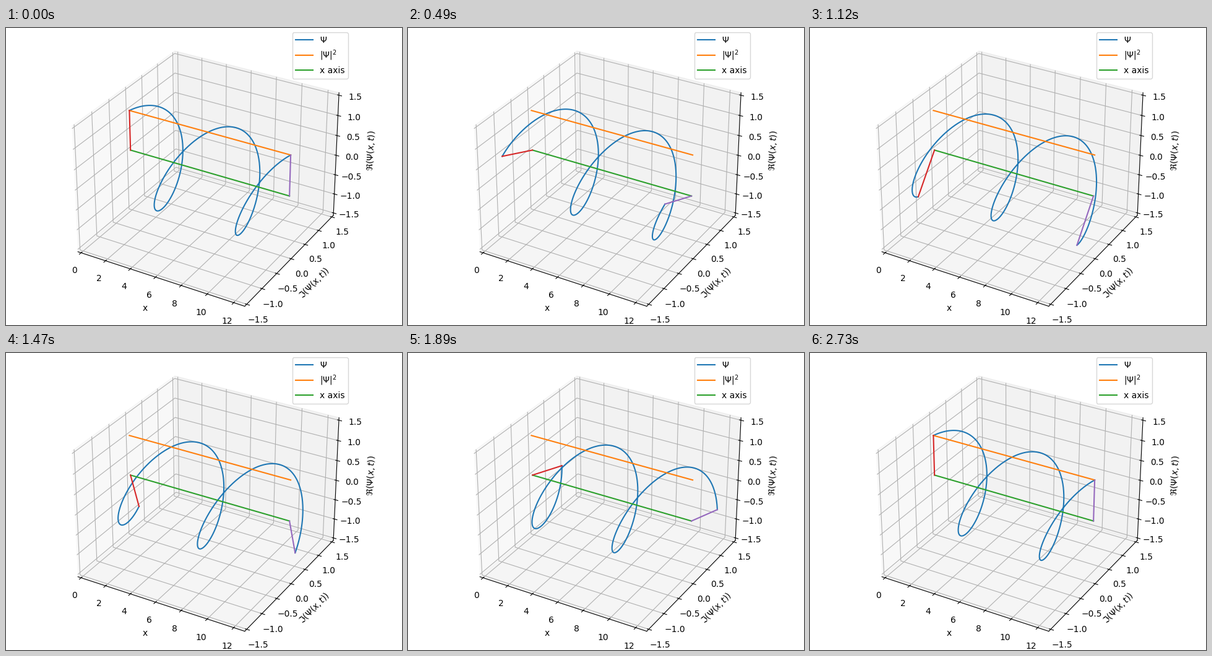
Recreate the animation shown at these times as a matplotlib script. Size 640 by 480 pixels, loop 2800 ms.

```python
import numpy as np
import matplotlib.pyplot as plt
from matplotlib.animation import FuncAnimation

FRAMES = 40
INTERVAL = 70
LENGTH = 4 * np.pi
AMP = 1.5


def padded(low, high):
    """Limits widened slightly so the end ticks sit inside the panes."""
    pad = (high - low) / 48
    return low - pad, high + pad


plt.rcParams["font.family"] = "DejaVu Sans"
fig = plt.figure(figsize=(6.4, 4.8), dpi=100)
ax = fig.add_axes([0, 0, 1, 1], projection="3d")

x = np.linspace(0, LENGTH, 500)
ends = [0, LENGTH]

wave, = ax.plot([], [], [], label=r"$\Psi$")
ax.plot(ends, [0, 0], [1, 1], label=r"$|\Psi|^2$")
ax.plot(ends, [0, 0], [0, 0], label="x axis")
pointers = [(x0, ax.plot([], [], [])[0]) for x0 in ends]

ax.set_xlim(*padded(0, LENGTH))
ax.set_ylim(*padded(-AMP, AMP))
ax.set_zlim(*padded(-AMP, AMP))
ax.set_xticks(np.arange(0, 13, 2))
ax.set_yticks(np.arange(-AMP, AMP + 0.1, 0.5))
ax.set_zticks(np.arange(-AMP, AMP + 0.1, 0.5))
ax.set_xlabel("x")
ax.set_ylabel(r"$\Im(\Psi(x,t))$")
ax.set_zlabel(r"$\Re(\Psi(x,t))$")
ax.legend(loc="upper right")


def update(i):
    # The first and last steps share the same phase.
    t = 2 * np.pi * i / (FRAMES - 1)
    psi = np.exp(1j * (x - t))
    wave.set_data_3d(x, psi.imag, psi.real)
    for x0, line in pointers:
        tip = np.exp(1j * (x0 - t))
        line.set_data_3d([x0, x0], [0, tip.imag], [0, tip.real])
    return [wave] + [line for _, line in pointers]


anim = FuncAnimation(fig, update, frames=FRAMES, interval=INTERVAL,
                     repeat=True, repeat_delay=0, blit=False)
plt.show()
```
